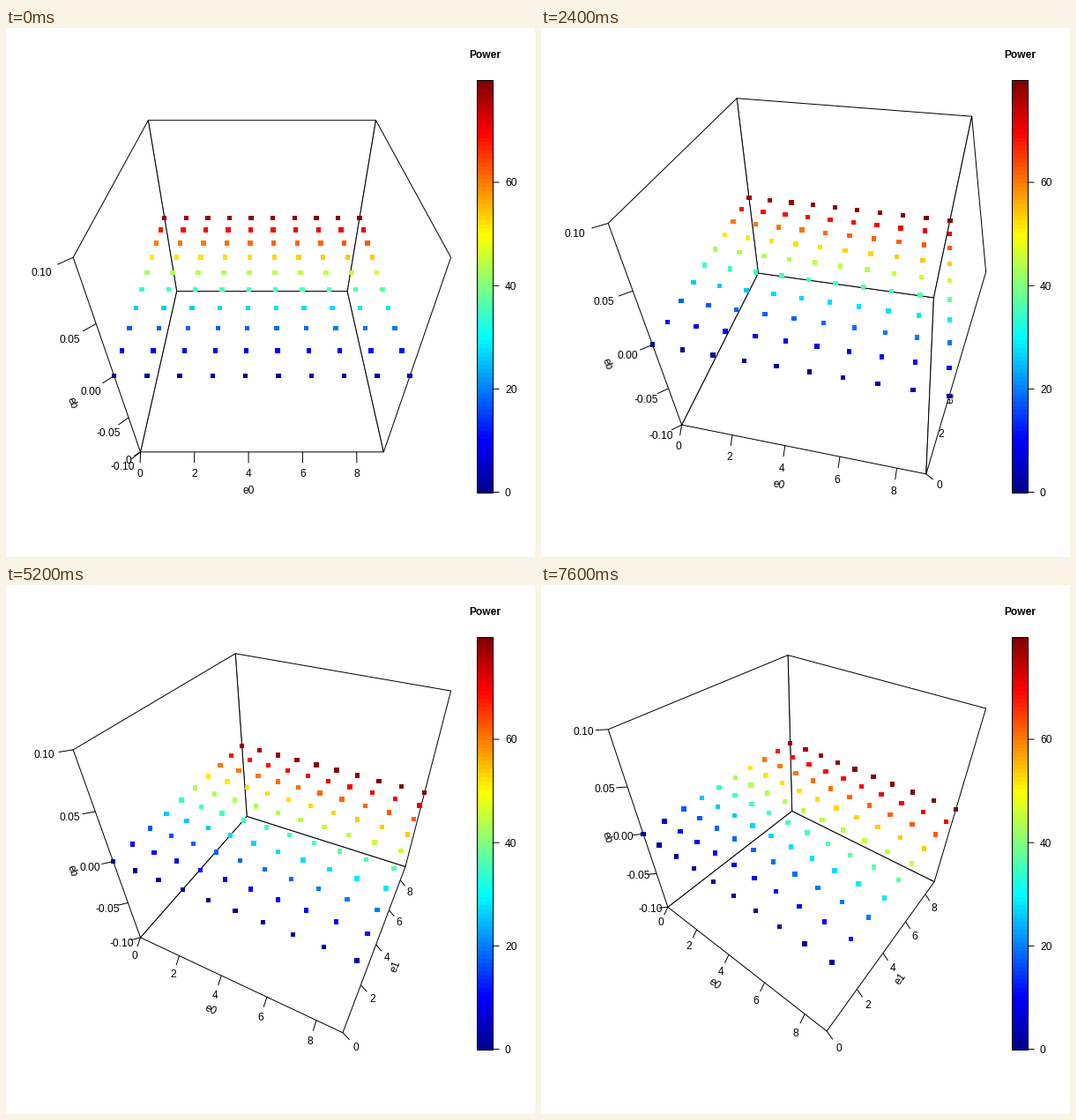
A matplotlib script that plays this animation: 600x600 px, repeating every 8000 ms.

```python
import numpy as np
import matplotlib.pyplot as plt
from matplotlib.animation import FuncAnimation
from matplotlib.collections import PolyCollection
from matplotlib.colors import LinearSegmentedColormap
from matplotlib.patches import Polygon, Rectangle

SIZE, FRAMES, INTERVAL = 600, 20, 400
PX = 0.72                       # one pixel in points at 100 dpi
TURN, TILT = 2, np.radians(40)  # degrees per frame, view elevation
EYE = 2 + np.sqrt(3)
LEFT, RIGHT, TOP, BOTTOM = 59.04, 521.76, 59.04, 526.56
PEAK = 79.8
TICK = 0.06

plt.rcParams["font.family"] = "Liberation Sans"

jet = LinearSegmentedColormap.from_list("jet100", [
    (0, (0, 0, 143 / 255)), (0.125, (0, 0, 1)), (0.375, (0, 1, 1)),
    (0.625, (1, 1, 0)), (0.875, (1, 0, 0)), (1, (128 / 255, 0, 0))], N=100)

fig = plt.figure(figsize=(6, 6), dpi=100, facecolor="white")


def stage_axes():
    ax = fig.add_axes([0, 0, 1, 1])
    frame_axes(ax)
    return ax


def frame_axes(ax):
    ax.set(xlim=(0, SIZE), ylim=(SIZE, 0))
    ax.axis("off")


def label(ax, x, y, text, angle=0, ha="center", weight="normal"):
    """Text whose capital height is centred on (x, y)."""
    a = np.radians(angle)
    ax.text(x + 4.3 * np.sin(a), y + 4.3 * np.cos(a), text, rotation=angle,
            rotation_mode="anchor", ha=ha, va="baseline", weight=weight,
            fontsize=12 * PX, color="black")


def line(ax, p, q):
    ax.plot([p[0], q[0]], [p[1], q[1]], color="black", lw=PX, snap=False,
            solid_capstyle="round")


def draw_key(ax):
    x0, x1 = 533.5, 552
    ax.imshow(np.arange(100)[::-1, None], cmap=jet, aspect="auto",
              extent=(x0, x1, BOTTOM, TOP), interpolation="nearest")
    ax.add_patch(Rectangle((x0, TOP), x1 - x0, BOTTOM - TOP, fill=False,
                           ec="black", lw=PX))
    for value in (0, 20, 40, 60):
        y = BOTTOM - value / PEAK * (BOTTOM - TOP)
        line(ax, (x1, y), (x1 + 7.2, y))
        label(ax, x1 + 14, y, str(value), ha="left")
    label(ax, 543, 30, "Power", weight="bold")
    frame_axes(ax)


def perspective(p, theta):
    """Project points of the cube [-1, 1]^3; returns x, y and depth."""
    x, y, z = np.moveaxis(np.asarray(p, float), -1, 0)
    c, s = np.cos(theta), np.sin(theta)
    side, near = x * c + y * s, x * s - y * c
    up = z * np.cos(TILT) - near * np.sin(TILT)
    depth = EYE - z * np.sin(TILT) - near * np.cos(TILT)
    return np.stack([side / depth, up / depth, depth], -1)


CORNERS = np.array([(x, y, z) for x in (-1, 1) for y in (-1, 1) for z in (-1, 1)])


def make_camera(theta):
    """Fit the projected cube into the plot region, 4 % clear on each side."""
    flat = perspective(CORNERS, theta)[:, :2]
    low, high = flat.min(0), flat.max(0)
    room = np.array([RIGHT - LEFT, BOTTOM - TOP]) / 1.08
    scale = (room / (high - low)).min()
    mid = (low + high) / 2

    def camera(p):
        q = perspective(p, theta)
        return np.stack([(LEFT + RIGHT) / 2 + (q[..., 0] - mid[0]) * scale,
                         (TOP + BOTTOM) / 2 - (q[..., 1] - mid[1]) * scale,
                         q[..., 2]], -1)
    return camera


def draw_axis(ax, camera, start, dim, outward, ticks, texts, title):
    start, outward = np.array(start, float), TICK * np.array(outward, float)

    def at(pos, steps):
        p = start + steps * outward
        p[dim] = pos
        return camera(p)[:2]

    for pos, text in zip(ticks, texts):
        line(ax, at(pos, 0), at(pos, 1))
        label(ax, *at(pos, 2), text)
    a, b = sorted((at(ticks[0], 0), at(ticks[-1], 0)), key=lambda p: p[0])
    angle = np.degrees(np.arctan2(a[1] - b[1], b[0] - a[0]))
    label(ax, *at((ticks[0] + ticks[-1]) / 2, 3.5), title, angle)


# Wall outlines, ordered so that a positive area means the inside is seen
WALLS = [
    [(-1, -1, -1), (1, -1, -1), (1, 1, -1), (-1, 1, -1)],
    [(-1, 1, -1), (1, 1, -1), (1, 1, 1), (-1, 1, 1)],
    [(-1, -1, -1), (-1, 1, -1), (-1, 1, 1), (-1, -1, 1)],
    [(1, 1, -1), (1, -1, -1), (1, -1, 1), (1, 1, 1)],
]


def draw_walls(ax, camera):
    for wall in WALLS:
        p = camera(wall)[:, :2]
        x, y = p.T
        area = np.sum(np.roll(x, -1) * y - x * np.roll(y, -1))
        if area > 0:
            ax.add_patch(Polygon(p, fc="white", ec="black", lw=PX, snap=False,
                                 joinstyle="round", zorder=3))


E0, E1 = (g.ravel() for g in np.meshgrid(np.arange(10), np.arange(10)))
GRID = np.stack([E0 / 4.5 - 1, E1 / 4.5 - 1, np.zeros(100)], -1)
STEP0 = 0.3
POWER = STEP0 * E0 + (PEAK / 9 - STEP0) * E1


def draw_points(ax, camera):
    p = camera(GRID)
    order = np.argsort(-p[:, 2])
    low, high = np.round(p[:, :2] - 2.7), np.round(p[:, :2] + 2.7)
    squares = [[(a, b), (c, b), (c, d), (a, d)]
               for (a, b), (c, d) in zip(low[order], high[order])]
    ax.add_collection(PolyCollection(
        squares, facecolors=jet(POWER[order] / PEAK), edgecolors="none",
        antialiaseds=False, zorder=4), autolim=False)


EVEN = np.arange(0, 9, 2)
EVEN_TEXT = [str(v) for v in EVEN]
HEIGHTS = np.linspace(-1, 1, 5)
HEIGHT_TEXT = ["-0.10", "-0.05", "0.00", "0.05", "0.10"]


def draw(i):
    scene.clear()
    frame_axes(scene)
    camera = make_camera(np.radians(TURN * i))
    side = -1 if i == 0 else 1
    draw_axis(scene, camera, (0, -1, -1), 0, (0, -1, -1),
              EVEN / 4.5 - 1, EVEN_TEXT, "e0")
    draw_axis(scene, camera, (side, 0, -1), 1, (side, 0, -1),
              EVEN / 4.5 - 1, EVEN_TEXT, "e1")
    draw_axis(scene, camera, (-1, -1, 0), 2, (-1, -1, 0),
              HEIGHTS, HEIGHT_TEXT, "eb")
    # Walls hide any label that falls behind them
    for text in scene.texts:
        text.set_zorder(2)
    draw_walls(scene, camera)
    draw_points(scene, camera)
    return []


scene = stage_axes()
draw_key(stage_axes())
anim = FuncAnimation(fig, draw, frames=FRAMES, interval=INTERVAL,
                     init_func=lambda: draw(0), repeat=True, repeat_delay=0,
                     blit=False)
plt.show()
```
